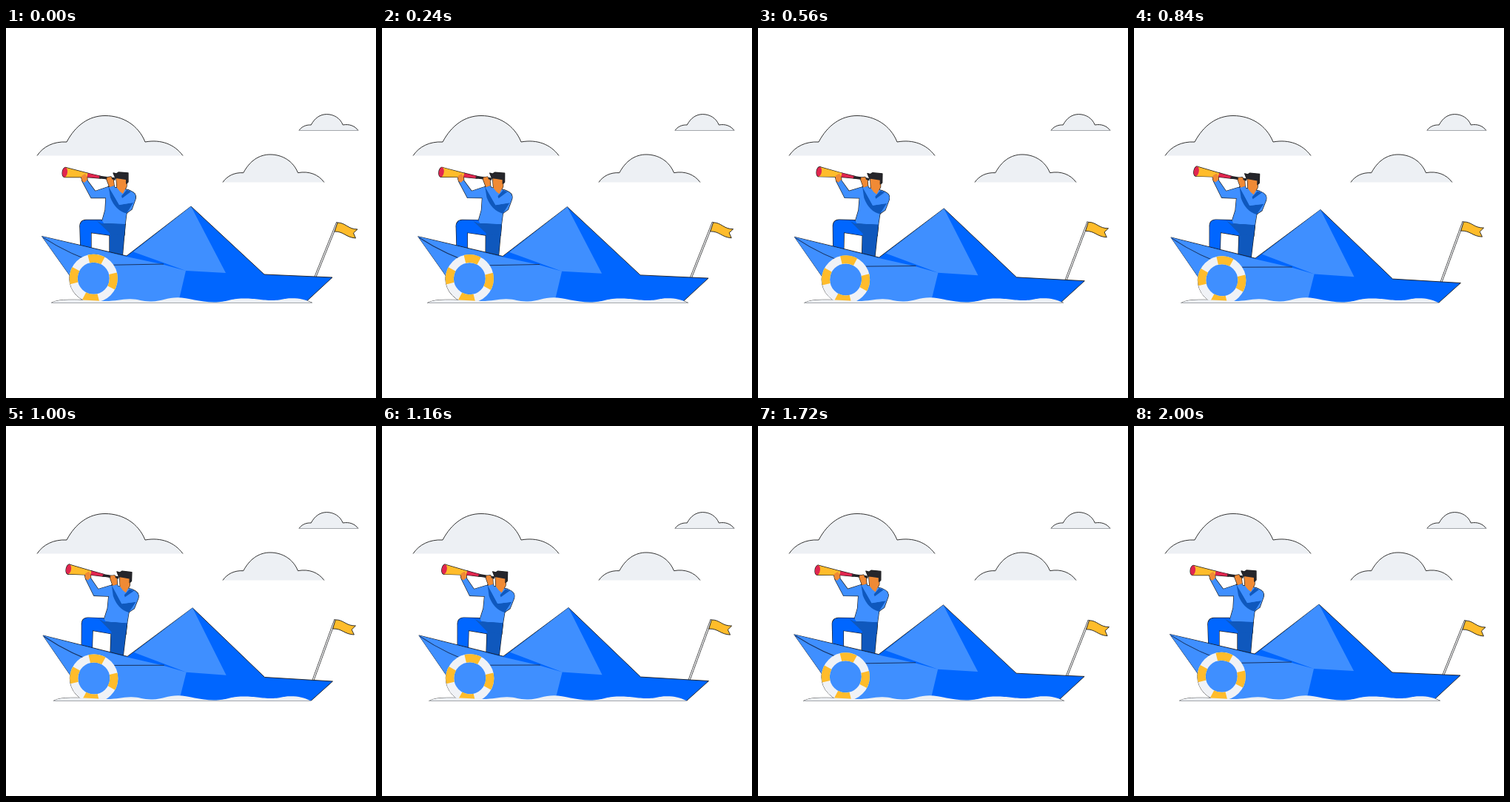
An HTML page that plays this animation: 500 by 500 pixels, repeating every 2040 ms.

```html
<!DOCTYPE html>
<html lang="en">
<head>
<meta charset="utf-8">
<title>Paper boat</title>
<style>
  html, body { margin: 0; width: 100%; height: 100%; overflow: hidden; background: #fff; }
  svg { display: block; width: 100vw; height: 100vh; }
  .edge { stroke: #1c1c1c; stroke-width: .9; stroke-linejoin: round; vector-effect: non-scaling-stroke; }
  .rim { stroke: #1c1c1c; stroke-width: 1.3; stroke-linejoin: round; }
  .pale { fill: #edf0f4; }
  .light { fill: #3f8fff; }
  .blue { fill: #0066ff; }
  .shade { fill: #0f58bd; }
  .skin { fill: #f08a35; }
  .gold { fill: #ffbc2b; }
  .red { fill: #e0264f; }
  .dark { fill: #26262b; }
  .line { fill: none; stroke: #17315f; stroke-width: 1; }
  .base { stroke: #a4a7ac; stroke-width: 1; }
</style>
</head>
<body>
<svg viewBox="0 0 500 500">
  <defs>
    <path id="cloud" class="pale edge" d="M0 0C8-12 22-19.500 40-18.500C52-41 70-54 92-54C116-54 137-41 146-18.500C168-22.500 186-15 197 0"/>
    <path id="wave" d="M61 371.500Q69 367.300 85 367.300C105 367 120 368.500 130 369C148 369.500 154 366.500 167 366.300S184 370 197 369.500S218 364.200 232 364.200S262 370.500 281 370.500S302 365.500 321 365.500S345 368 360 368S374 365.300 386 365.300S404 367 414 371.500Z"/>
    <clipPath id="above"><path d="M0 0H500V371.500H0Z"/></clipPath>

    <g id="body">
      <!-- torso and front arm -->
      <path class="light" d="M137 215L151 216L166 219L174 224Q176 227 175 231L170 245L163 250L161 265.500L129 264L134 246L135 229.500H115L103.500 208L109 205L120.500 220.500Z"/>
      <!-- legs -->
      <path class="shade" d="M122 260L129 264L161 265L157 312L140 309V280Z"/>
      <path class="blue" d="M129 259.500H108Q99 260 100 270L101 302L115 303V276.500L140 280L141 276Z"/>
      <path class="shade" d="M122 260L129 264L161 265L160 280L141 278Z"/>
      <!-- back arm -->
      <path class="shade" d="M138.500 214L153 239L172 236L163 250.500Q148 247 141 229Z"/>
      <path class="light" d="M139 215L146 213L152 228L160 221L168 220Q176 223 175 230L171 236L153 239Z"/>
      <path class="shade" d="M156 227L163 219L169 221L157 230Z"/>
      <!-- head, hands and telescope -->
      <path class="skin" d="M101 198L109 198L110 205L106 209L103 207ZM135 202L145 203L146 213L140 215ZM149 203H163V214L158 224L154 221L150 216Z"/>
      <path class="dark" d="M145 196L149 197L152 195L165 196V208L162 211V205L148 203Z"/>
      <path class="gold" d="M80 188.500L111 196.500L109.500 201.500L79 201.500Z"/>
      <path class="red" d="M110.500 196.300L128 200.300V203L109.500 201.500Z"/>
      <path class="dark" d="M126 200.300L147 203V205L126 202.700Z"/>
      <ellipse class="red" cx="79.600" cy="195" rx="3.400" ry="6.500" transform="rotate(8 79.600 195)"/>
      <path class="skin" d="M102 200L107 197L109.500 201L108 206L103 206ZM136 202L142 201L144 206L139 209Z"/>
    </g>
  </defs>

  <use href="#cloud" transform="translate(42 172.500)"/>
  <use href="#cloud" transform="translate(293 208.500) scale(.695)"/>
  <use href="#cloud" transform="translate(396 138.500) scale(.406)"/>
  <path class="base" d="M396 138.500H476"/>

  <g class="sea"><use href="#wave" class="pale edge"/></g>

  <g id="flag">
    <path d="M412 351L447.700 262.500" stroke="#1c1c1c" stroke-width="2.800"/>
    <path d="M412 351L447.500 263" stroke="#f4f5f7" stroke-width="1.500"/>
    <path class="gold edge" d="M448 263C459 263 462 272 475 272L469.500 277L472.500 284C459 283 457 275 444 275Z"/>
  </g>

  <g id="man">
    <use href="#body" class="rim"/>
    <use href="#body"/>
  </g>

  <g clip-path="url(#above)">
    <g id="boat">
      <circle class="pale edge" cx="118.300" cy="338.300" r="32.500"/>
      <path class="edge blue" d="M163 308L250 241L349 333L441 337L400 375H115L48.500 281.500Z"/>
      <path class="light" d="M172 302.500L250 241L297 331L243 328ZM48.500 281.500L163 309L210 319L243 328L232 375H115Z"/>
      <path class="line" d="M50 283Q87 307 131 320.500L213 319"/>

      <!-- lifebuoy -->
      <g transform="translate(118.300 338.300)">
        <circle class="light" r="27"/>
        <circle r="27" fill="none" stroke="#f0f2f6" stroke-width="11"/>
        <circle r="27" fill="none" stroke="#ffbc2b" stroke-width="11" pathLength="360" stroke-dasharray="42 48" transform="rotate(-14)"/>
      </g>
    </g>
  </g>

  <g class="sea">
    <use href="#wave" class="pale"/>
    <path class="base" d="M61 371.500H414"/>
  </g>
</svg>
<script>
  const LOOP = 2040, STEP = 40, SWING = 2000;
  const boat = document.getElementById('boat');
  const man = document.getElementById('man');
  const flag = document.getElementById('flag');
  const seas = document.querySelectorAll('.sea');

  const turn = (el, deg, x, y) => el.setAttribute('transform', `rotate(${deg} ${x} ${y})`);

  function draw(now) {
    const t = Math.floor(now % LOOP / STEP) * STEP;
    const k = (1 - Math.cos(2 * Math.PI * t / SWING)) / 2;
    turn(boat, 0.95 * k, -42, 371);
    turn(man, 2 * k, 122, 338);
    turn(flag, -2 * k, 415, 343);
    for (const sea of seas)
      sea.setAttribute('transform', `translate(273 0) scale(${1 - 0.014 * k} 1) translate(-273 0)`);
  }

  const start = performance.now();
  function tick() {
    draw(performance.now() - start);
    requestAnimationFrame(tick);
  }
  tick();
</script>
</body>
</html>
```
